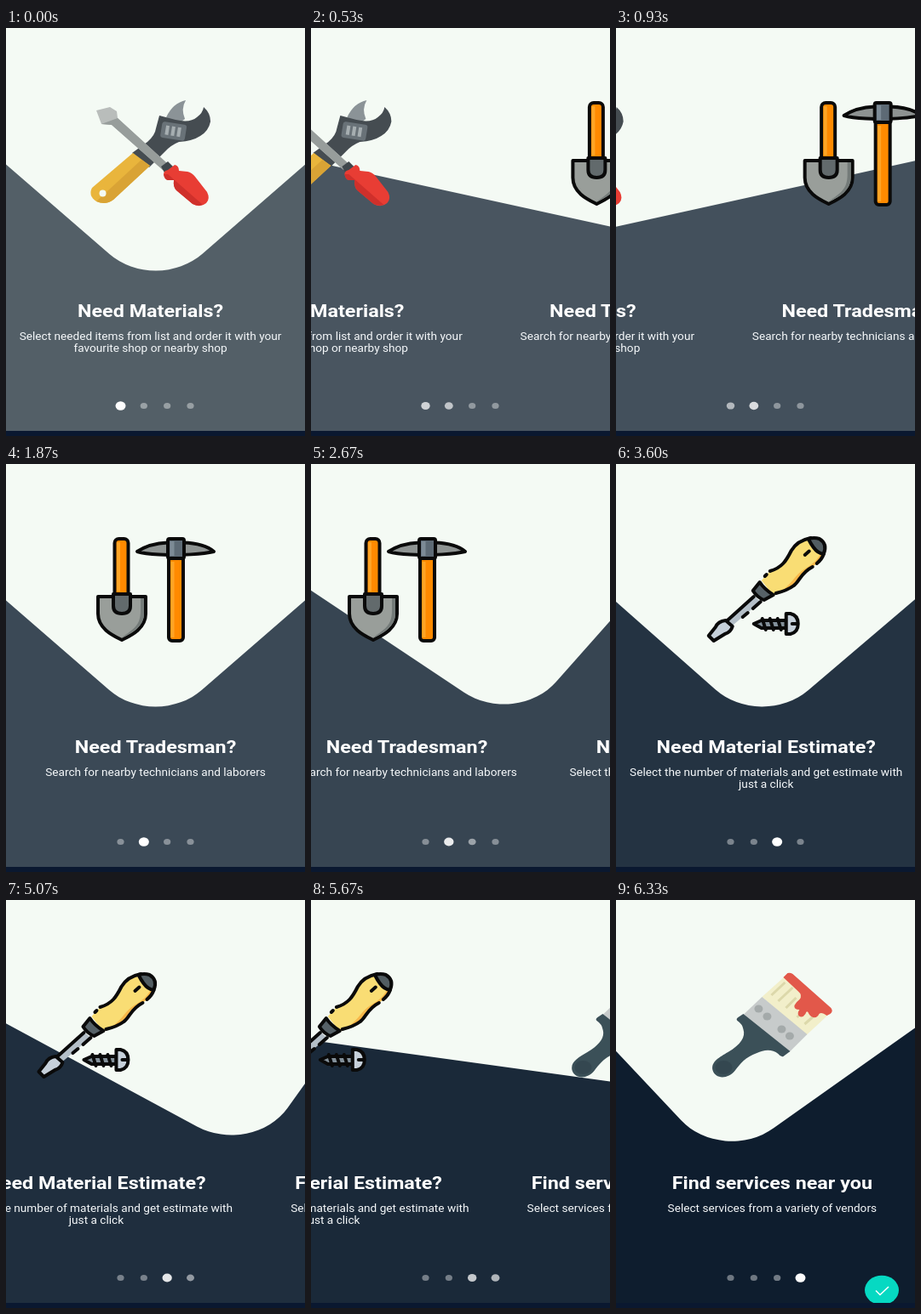
An HTML page for the animation above (6.39 s loop, 351 by 480 pixels).

```html
<!DOCTYPE html>
<html lang="en">
<head>
<meta charset="utf-8">
<title>Onboarding pager</title>
<style>
  html, body { margin: 0; width: 100%; height: 100%; overflow: hidden; }
  svg { display: block; width: 100vw; height: 100vh; }
  text { font-family: Roboto, Arial, sans-serif; font-size: 11.87px; fill: #f5f8fa; text-anchor: middle; }
  .title { font-size: 20.3px; font-weight: 700; fill: #fff; }
  .ink { stroke: #0a0a0a; stroke-width: 4; stroke-linejoin: round; stroke-linecap: round; }
  .line { fill: none; }
</style>
</head>
<body>
<svg viewBox="0 0 351 480" preserveAspectRatio="none">
  <rect id="back" width="351" height="480"/>
  <g transform="translate(175.5 -123.5) scale(1.15 1)">
    <rect id="sheet" x="-308.8" y="-308.8" width="617.6" height="617.6" rx="67" fill="#f4faf4"/>
  </g>

  <g class="page">
    <g transform="translate(6 0)">
      <path d="M188 105Q196 88 211 85Q205 95 210 107L200 114Z" fill="#8b9397"/>
      <path d="M148 147L166 134Q175 126 176 118L180 103L199 108Q216 112 224 105Q231 100 232 93Q240 100 240 110Q238 121 228 127Q219 133 203 134Q193 138 186 146L168 164Z" fill="#454c51"/>
      <g transform="translate(197 122) rotate(9)">
        <rect x="-15" y="-10" width="29" height="19" rx="3" fill="#697278"/>
        <path d="M-8 -6V5M-1 -6V5M6 -6V5" stroke="#a6aeb1" stroke-width="4"/>
      </g>
      <path d="M149 147L169 162L126 202Q117 209 106 204Q96 197 101 188Z" fill="#e9b53c"/>
      <path d="M159 155L169 162L126 202Q117 209 106 204Z" fill="#d9a335"/>
      <circle cx="113.5" cy="194.5" r="4" fill="#f4faf4"/>
      <path d="M106 97L122 93L130 98L131 106L190 160L184 167L124 114L112 113Z" fill="#b9bdbb"/>
      <path d="M112 113L131 106L190 160L184 167L124 114Z" fill="#979d9b"/>
      <path d="M182 163L190 157L197 164L187 172Z" fill="#3f474c"/>
      <path d="M185 172Q185 168 190 167L198 161Q203 162 203 168L213 169Q218 170 222 175L236 193Q240 201 235 206Q228 212 219 207L200 191Q196 187 197 179L190 179Q186 178 185 172Z" fill="#e83d34"/>
      <path d="M190 172L231 208Q225 210 219 207L200 191Q196 187 197 179L190 179Q186 178 185 172Z" fill="#cf302b"/>
    </g>
    <g transform="translate(175.5 0) scale(1.15 1)">
      <text class="title" y="340">Need Materials?</text>
      <text y="367">Select needed items from list and order it with your</text>
      <text y="381">favourite shop or nearby shop</text>
    </g>
  </g>

  <g class="page">
    <g class="ink">
      <rect x="127.5" y="88" width="16" height="72" rx="5" fill="#ff8a00"/>
      <path d="M108 156H164V176C164 194 146 202 136 207C126 202 108 194 108 176Z" fill="#999e9a"/>
      <path d="M158 158H162V176C162 192 146 200 136 204C150 194 158 190 158 172Z" fill="#747b79" stroke="none"/>
      <path d="M126 153H146V167Q146 176 136 176Q126 176 126 167Z" fill="#626a6c"/>
      <path d="M154 103C166 95 179 93 190 92.500H208C222 93 236 96 244 103C232 106 220 106 208 107H190C178 106 166 107 154 103Z" fill="#8e9392"/>
      <rect x="191" y="105" width="17" height="103" rx="4" fill="#ff8a00"/>
      <rect x="190" y="88" width="19" height="23" rx="2" fill="#5d6a75"/>
    </g>
    <path d="M132 92V150M195.500 115V204" stroke="#ffa526" stroke-width="4"/>
    <path d="M195 91V108" stroke="#7d8b96" stroke-width="5"/>
    <g transform="translate(175.5 0) scale(1.15 1)">
      <text class="title" y="340">Need Tradesman?</text>
      <text y="367">Search for nearby technicians and laborers</text>
    </g>
  </g>

  <g class="page">
    <path d="M170 137L180 126C197 121 200 112 205 102C212 91 226 85 238 88C246 93 246 104 241 111C235 120 224 123 218 130C212 138 209 145 200 148L184 155Z" fill="#f9dd74"/>
    <path d="M243 107C235 120 224 123 218 130C212 138 209 145 200 148L190 152C204 143 209 132 217 126C226 120 234 116 239 106Z" fill="#f8b84a"/>
    <g class="ink">
      <path d="M225 88Q232 86 238 88Q248 94 243 106Q236 105 231 98Q228 94 225 88Z" fill="#525d62"/>
      <path class="line" d="M174 132L176 130M180 126C194 122 199 114 205 102Q212 90 228 87M243 106Q241 112 235 117M230 121C216 128 215 138 208 143Q200 149 187 152M221 107L226 102.500"/>
      <path d="M168 139Q173 147 184 154L173 160Q165 157 160 149Z" fill="#566167"/>
      <path d="M162 156L130 184L136 190L169 162Z" fill="#b4bfc8" stroke="none"/>
      <path class="line" d="M161 156L130 184M169 162L160 170M154 175L148 180"/>
      <path d="M128 184L136 191Q134 198 127 200L114 208L108 202L116 192Q119 185 128 184Z" fill="#c6d0da"/>
      <path d="M161 188L170 184H199V193H170Z" fill="#83909a"/>
      <path class="line" d="M171 182L175 195M180 182L184 195M189 182L193 195"/>
      <path d="M199 176H204Q213 178 213 188Q213 198 204 200H199Z" fill="#c6d0da"/>
      <path class="line" d="M206 188H212"/>
    </g>
    <g transform="translate(175.5 0) scale(1.15 1)">
      <text class="title" y="340">Need Material Estimate?</text>
      <text y="367">Select the number of materials and get estimate with</text>
      <text y="381">just a click</text>
    </g>
  </g>

  <g class="page">
    <g transform="translate(-8.4 0)">
      <path d="M172 114L202 87L253 132L224 159Z" fill="#f2efca"/>
      <path d="M183 112L199 97M191 119L208 103M200 127L212 115M213 138L222 130M222 146L238 132" stroke="#dcd8aa" stroke-width="3"/>
      <path d="M197 91L202 86Q205 85 208 87L253 127Q256 131 252 134L248 136Q242 131 239 134Q237 139 232 138Q228 137 226 132Q224 130 223 134Q219 140 215 136Q213 133 216 129Q209 129 210 124Q212 120 216 117Q220 112 214 107Z" fill="#e2584a"/>
      <path d="M172 114L225 158L204 179L149 136Z" fill="#c7cbcb"/>
      <g fill="#a4aaaa">
        <ellipse cx="168" cy="128" rx="5" ry="4.500"/><ellipse cx="178" cy="137" rx="5" ry="4.500"/>
        <ellipse cx="195" cy="152" rx="5" ry="4.500"/><ellipse cx="204.500" cy="160" rx="5" ry="4.500"/>
      </g>
      <path d="M150 134L205 178L197 184Q194 185 191 181C184 175 174 176 166 180C152 185 147 192 140 201C132 211 117 211 114 200C112 190 122 185 132 179C147 170 153 161 150 152Q149 146 143 142Q141 140 144 138Z" fill="#3b5058"/>
      <ellipse cx="127" cy="197" rx="10" ry="8" fill="#344750"/>
    </g>
    <g transform="translate(175.5 0) scale(1.15 1)">
      <text class="title" y="340">Find services near you</text>
      <text y="367">Select services from a variety of vendors</text>
    </g>
  </g>

  <g id="dots" fill="#fff"></g>
  <g id="done">
    <ellipse cx="312" cy="459" rx="20" ry="17.3" fill="#06d9c2"/>
    <path class="line" d="M305 459.500L310 464.500L320 455" stroke="#fff" stroke-width="1.6"/>
  </g>
  <rect y="474" width="351" height="6" fill="#0a1830"/>
</svg>
<script>
const LOOP = 6390, STEP = 200 / 3, WIDTH = 351;
const LAG = 90;            // the sheet turns slightly behind the pages
const RELEASE_SPEED = 0.2; // pages per second when the finger lifts
const SLOW = 12, FAST = 26; // spring decay rates per second

const colors = [[83, 95, 103], [59, 73, 86], [36, 51, 66], [13, 28, 46]];

// Finger drags: [ms, fraction of a page]; each ends where the finger lifts.
const drags = [
  [[-200, 0], [0, 0.017], [250, 0.15], [500, 0.4], [700, 0.58], [840, 0.657], [930, 0.675]],
  [[2380, 0], [2500, 0.02], [2700, 0.22], [2900, 0.52], [3040, 0.657], [3130, 0.67]],
  [[4480, 0], [4800, 0.035], [4980, 0.148], [5070, 0.2], [5250, 0.3], [5800, 0.48], [6060, 0.67]]
];

const pages = [...document.querySelectorAll('.page')];
const $ = id => document.getElementById(id);
const back = $('back'), sheet = $('sheet'), done = $('done');
const dots = pages.map((_, i) => {
  const dot = document.createElementNS('http://www.w3.org/2000/svg', 'ellipse');
  dot.setAttribute('cx', 175.5 + (i - 1.5) * 27.33);
  dot.setAttribute('cy', 444.5);
  return $('dots').appendChild(dot);
});

const mix = (a, b, f) => a + (b - a) * f;

function slope(pts, i) {
  if (i === 0) return 0;
  if (i === pts.length - 1) return RELEASE_SPEED / 1000;
  const [t0, v0] = pts[i - 1], [t1, v1] = pts[i + 1];
  return (v1 - v0) / (t1 - t0);
}

function drag(pts, t) {
  const i = pts.findIndex(p => p[0] > t) - 1;
  const [t0, v0] = pts[i], [t1, v1] = pts[i + 1];
  const d = t1 - t0, s = (t - t0) / d, r = 1 - s;
  return r * r * (1 + 2 * s) * v0 + s * s * (3 - 2 * s) * v1
    + d * s * r * (r * slope(pts, i) - s * slope(pts, i + 1));
}

// Overdamped spring to the next page.
function settle(from, seconds) {
  const gap = 1 - from, fast = (RELEASE_SPEED - SLOW * gap) / (FAST - SLOW);
  return 1 - (gap - fast) * Math.exp(-SLOW * seconds) - fast * Math.exp(-FAST * seconds);
}

function position(t) {
  let n = drags.length - 1;
  while (n > 0 && t < drags[n][0][0]) n--;
  const pts = drags[n], [end, value] = pts[pts.length - 1];
  return n + (t < end ? drag(pts, t) : settle(value, (t - end) / 1000));
}

function draw(t) {
  const p = position(t), n = Math.min(2, Math.floor(p));
  const color = colors[n].map((c, k) => Math.round(mix(c, colors[n + 1][k], p - n)));
  back.setAttribute('fill', `rgb(${color})`);
  sheet.setAttribute('transform', `rotate(${45 - 90 * position(t - LAG)})`);
  pages.forEach((page, i) => page.setAttribute('transform', `translate(${(i - p) * WIDTH} 0)`));
  dots.forEach((dot, i) => {
    const near = Math.max(0, 1 - Math.abs(i - p));
    const rx = mix(4.1, 6, near);
    dot.setAttribute('rx', rx);
    dot.setAttribute('ry', rx / 1.15);
    dot.setAttribute('opacity', mix(0.4, 1, near));
  });
  done.style.display = p >= 2.5 ? '' : 'none';
}

const start = performance.now();
function tick() {
  const t = (performance.now() - start) % LOOP;
  draw(Math.floor((t + 5) / STEP) * STEP);
  requestAnimationFrame(tick);
}
tick();
</script>
</body>
</html>
```
